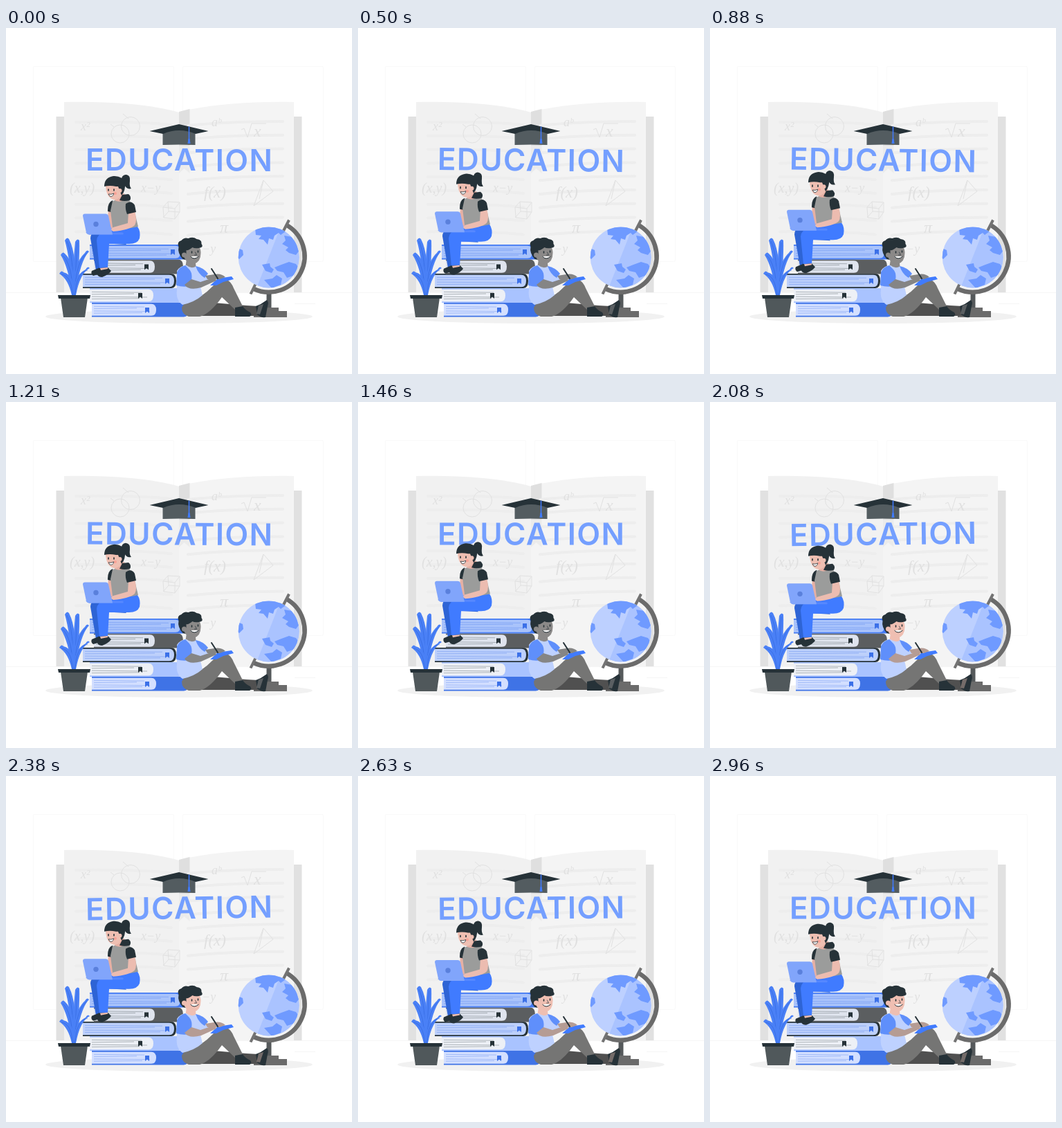
Animation, 500 px wide and 500 px high, one loop 3000 ms. Source, as an HTML page:

```html
<!DOCTYPE html>
<html lang="en">
<head>
<meta charset="utf-8">
<title>Education</title>
<style>
html, body { margin: 0; width: 100%; height: 100%; overflow: hidden; background: #fff; }
svg { display: block; width: 100vw; height: 100vh; }
#title { font: 600 44px Inter, "Open Sans", sans-serif; letter-spacing: 1.4px; fill: #749fff; text-anchor: middle; }
#notes text { font: italic 18px "Liberation Serif", serif; fill: #e0e0e0; }
#notes path, #notes circle { fill: none; stroke: #e1e1e1; }
#lines path { fill: none; stroke: #ededed; stroke-width: 4; stroke-linecap: round; }
#man { --skin: #efbfb2; --arm: #b59c94; }
#man.shade { --skin: #8b8988; --arm: #858585; }
.skin { fill: var(--skin); }
.arm { fill: var(--arm); }
.ink { fill: none; stroke: #263238; stroke-linecap: round; }
</style>
</head>
<body>
<svg viewBox="0 0 500 500">
  <g fill="none" stroke="#f9f9f9">
    <rect x="39.500" y="55.500" width="203" height="282" rx="2"/>
    <rect x="255.500" y="55.500" width="203" height="282" rx="2"/>
    <path d="M0 382.500H500M417 398.500H447" stroke="#f5f5f5"/>
  </g>

  <!-- open book -->
  <path d="M72.500 128H427.500V382H72.500Z" fill="#e1e1e1"/>
  <path d="M84 107C142 106 204 109 250 122V382H84Z" fill="#f1f1f1"/>
  <path d="M416 107C358 106 312 109 264 118L250 122V382H416Z" fill="#f4f4f4"/>
  <path d="M250 121L265.500 117V170H250Z" fill="#dfdfdf"/>
  <path d="M250 170H265.500V210L257.500 203L250 210Z" fill="#ebebeb"/>
  <g id="lines"></g>
  <g id="notes">
    <text x="108" y="148">x²</text>
    <text x="297" y="142">aᵇ</text>
    <text x="92" y="238" style="font-size:20px">(x,y)</text>
    <text x="195" y="237">x−y</text>
    <text x="286" y="245" style="font-size:23px">f(x)</text>
    <text x="309" y="296" style="font-size:24px">π</text>
    <text x="283" y="325">−y</text>
    <text x="358" y="157" style="font-size:24px">x</text>
    <path d="M340 147L344 145L349 158L355 138H376M372 220L386 236L358 257ZM372 220L366 247M227 259L234 251L251 252V266L244 276L228 274ZM227 259L244 261L251 252M244 261V276M227 274L235 265L251 266M235 265L234 251M169 124L177 131M151 139L156 143"/>
    <circle cx="180" cy="142" r="13.500"/>
    <circle cx="165" cy="153" r="13"/>
  </g>

  <ellipse cx="250" cy="417" rx="193" ry="10" fill="#f1f1f1"/>

  <!-- graduation cap -->
  <path d="M226.500 147H273.500V169Q250 168 226.500 169Z" fill="#535c60"/>
  <path d="M207.500 149L250 139L292.500 149L274 153Q250 143 227 153Z" fill="#263238"/>
  <path d="M264.500 142.500V164" fill="none" stroke="#407bff" stroke-width="1.500"/>
  <path d="M263.500 160H265.500L266.500 167H262.500Z" fill="#407bff"/>

  <text id="title" x="250.700" y="206.500">EDUCATION</text>

  <g id="books"></g>

  <!-- plant -->
  <g id="leaves"></g>
  <path d="M79 390H118L114 418H83Z" fill="#50585b"/>
  <path d="M75 386H122L121 391H76Z" fill="#263238"/>

  <!-- globe -->
  <g>
    <path d="M376.500 383H383.500V405H376.500Z" fill="#55595b"/>
    <path d="M366 409Q366 404 372 404H394V409H406V418H358V413Q360 409 366 409Z" fill="#6b6b6b"/>
    <path d="M404 284A51.900 51.900 0 0 1 358 377" fill="none" stroke="#6b6b6b" stroke-width="6.500"/>
    <path d="M409 277.500L400.500 294M362 367L353.500 384.500" stroke="#737373" stroke-width="4"/>
    <clipPath id="ball"><circle cx="379.700" cy="331.400" r="44"/></clipPath>
    <g clip-path="url(#ball)">
      <path d="M335 287H425V376H335Z" fill="#bdd0ff"/>
      <path d="M397 287L362 376H425V287Z" fill="#aac3ff"/>
      <g fill="#6f9aff">
        <path d="M360 290L372 287L399 288L404 294L397 299L394 296L388 300L386 306L380 304L378 313L372 306L365 305L369 300L361 299Z"/>
        <path d="M402 300L414 302L425 320L419 328L409 325L404 321L408 317L399 312L404 307Z"/>
        <path d="M335 318L342 321L343 328L337 334L333 331Z"/>
        <path d="M370 342L381 340L382 345L387 349L384 354L375 351Z"/>
        <path d="M388 346L398 342L409 338L419 341L424 348L415 358L406 361L401 353L392 351Z"/>
        <path d="M373 364L385 362L391 357L399 362L397 371L384 376Z"/>
      </g>
    </g>
  </g>

  <!-- man -->
  <g id="man">
    <path d="M268 416Q278 398 300 397L347 401L365 402V416Z" fill="#505050"/>
    <path d="M361 402L368 399L377 393Q380 396 378 402L375 418Q368 419 363 414Z" fill="#263238"/>
    <path d="M365 401L372 399L367 414L362 413Z" class="arm" opacity=".55"/>
    <path d="M257 399Q281 392 300 372Q310 362 319 364Q325 366 329 376L343 404L331 407L312 389Q295 413 280 417H264Q254 414 254 404Z" fill="#757574"/>
    <path d="M331 404L342 402Q346 408 353 411Q356 415 352 417H331Z" fill="#263238"/>
    <path d="M261 334L274 340L275 349L259 347Z" class="skin"/>
    <path d="M247 351Q252 343 261 343Q268 349 275 344Q284 347 290 358L293 370L281 374L284 386Q273 396 255 400Q245 393 247 378Z" fill="#bed1ff"/>
    <path d="M247 353Q251 345 259 343L265 349Q272 357 265 373Q256 375 246 372Z" fill="#5f8ffb"/>
    <path d="M274 344Q285 346 292 355L287 361Q278 356 274 344Z" fill="#5f8ffb"/>
    <path d="M295 372L306 362L326 359L329 363L314 367L304 372Z" fill="#407bff"/>
    <path d="M258 371Q264 380 282 375L304 365L302 360L281 367L268 363Z" class="arm"/>
    <path d="M288 358L301 356Q311 354 317 360L309 363L291 363Z" class="arm"/>
    <path d="M297 348L306 362" class="ink" stroke-width="2"/>
    <g transform="translate(-.5 -1)">
      <path d="M255 324Q256 312 270 313Q282 314 282 326Q282 339 272 342Q258 341 255 324Z" class="skin"/>
      <path d="M256 335Q248 326 250 317Q247 310 254 308Q258 303 264 305Q271 302 276 306Q284 307 283 313Q287 318 279 319Q273 320 270 318Q264 323 261 322L261 328Q257 325 257 331L260 336Z" fill="#263238"/>
      <circle cx="258" cy="329" r="3.500" class="skin"/>
      <path d="M269 324V326M278 323V325" class="ink" stroke-width="1.600"/>
      <path d="M267 331Q272 337 279 331" fill="#fff" stroke="#263238"/>
      <path d="M274 325L276 329L273 329" class="ink" stroke-width=".7"/>
    </g>
  </g>

  <!-- woman -->
  <g id="woman">
    <path d="M154 289L144 290Q122 292 122 304L130 350H142L138 311L174 313Z" fill="#2e64d5"/>
    <path d="M124 351L136 346L143 350L140 354L126 358Q122 355 124 351Z" fill="#263238"/>
    <path d="M154 288L190 287Q195 294 193 304Q190 312 178 312L149 312L147 347H135L131 307Q132 297 143 295Z" fill="#407bff"/>
    <path d="M135 347L147 346L152 351Q149 356 139 360Q133 360 132 356Z" fill="#263238"/>
    <path d="M136 347L147 346V348L137 350Z" fill="#efbfb2"/>
    <path d="M148 264L154 265L156 288L150 290L146 284Z" fill="#e6b0a4"/>
    <path d="M147 263Q147 252 154 249L157 267L147 265Z" fill="#263238"/>
    <path d="M154 250Q165 246 178 249L184 258L191 287Q173 292 154 288L151 264Z" fill="#9b9c9b"/>
    <path d="M160 242L171 239L173 248Q164 253 157 249Z" fill="#e6b0a4"/>
    <path d="M168 241L177 240Q182 244 179 249Q171 251 164 249Z" fill="#263238"/>
    <path d="M177 266L186 264Q190 279 186 285Q178 292 155 294L150 291L155 288L176 282Z" fill="#ecbcb0"/>
    <path d="M173 254Q181 248 186 256L188 266L175 269Q172 262 173 254Z" fill="#263238"/>
    <g transform="translate(1 1.500)">
      <path d="M114 294H167Q170 295 168 297H119Z" fill="#5688ff"/>
      <path d="M113 267H143Q146 267 147 270L153 297H119Q116 297 115 294L110 270Q110 267 113 267Z" fill="#81a5fb"/>
      <circle cx="129" cy="282" r="3.700" fill="#5a80dc"/>
    </g>
    <path d="M166 222Q167 211 174 212Q180 213 179 221Q178 229 181 232Q174 234 171 226Q169 220 164 226Z" fill="#263238"/>
    <path d="M144 228Q144 216 156 215Q169 215 171 227Q170 235 168 240Q163 249 156 248Q145 246 144 228Z" fill="#efbfb2"/>
    <path d="M142 229Q142 216 155 214Q168 213 172 224Q173 235 167 242L164 234L162 229L159 229Q150 227 142 229Z" fill="#263238"/>
    <circle cx="164.500" cy="235" r="3" fill="#efbfb2"/>
    <path d="M148 233V235M156 233V235" class="ink" stroke-width="1.600"/>
    <path d="M148 240Q152 241 156 239Q154 245 150 243Z" fill="#fff" stroke="#263238" stroke-width=".8"/>
    <circle cx="158" cy="239" r="2" fill="#ff8f83" opacity=".6"/>
  </g>
</svg>
<script>
const $ = id => document.getElementById(id);
const path = (d, fill, extra = '') => `<path d="${d}" fill="${fill}" ${extra}/>`;

// Ruled lines follow the bend of each page.
for (let i = 0; i < 9; i++) {
  const y = 136 + i * 19.8;
  $('lines').innerHTML +=
    path(`M101 ${y}Q190 ${y - 1} 239 ${y + 4}`, 'none') +
    path(`M263 ${y + 5}Q320 ${y - 1} 400 ${y - 1}`, 'none');
}

// A lying book: cover, rounded block of pages, ribbon.
function book(x, end, y, h, cover, pages, pageEnd, ribbon, ribbonX) {
  const block = (l, r, t, b) => `M${l} ${t}H${r - 7}Q${r} ${t} ${r} ${(t + b) / 2}T${r - 7} ${b}H${l}Z`;
  let out = path(block(x, end, y, y + h), cover) +
    path(block(x, pageEnd, y + 1.7, y + h - 1.7), pages);
  for (let i = 1; i < 5; i++) {
    const ly = y + 2 + i * (h - 4) / 5;
    out += path(`M${x + 3} ${ly}L${pageEnd - 6 - i * 11 % 30} ${ly + (i % 2 ? .8 : -.8)}`, 'none',
      `stroke="${ribbon}" stroke-width=".8" opacity=".4"`);
  }
  return out + path(`M${ribbonX} ${y + 7}h6v8l-3-2.500l-3 2.500Z`, ribbon);
}
$('books').innerHTML =
  book(124, 264, 397, 20.5, '#3f73e6', '#d3dfff', 217, '#3b70e8', 201) +
  book(121, 256, 376, 21, '#a9c3ff', '#edf0f6', 213, '#263238', 191) +
  book(111, 246, 355, 21, '#263238', '#bdd0fb', 243, '#3b70e8', 230) +
  book(127, 256, 334.5, 21, '#5b5e60', '#dfe4ee', 215, '#263238', 200) +
  book(121, 262, 313, 21.5, '#4178f2', '#a9c3fb', 252, '#3b70e8', 238);

// Each leaf runs from a base point to a tip through one bend.
const leaves = [
  [96, 386, 98, 330, 88, 304], [98, 386, 101, 340, 103, 306],
  [96, 386, 95, 340, 82, 325], [95, 386, 95, 358, 80, 352],
  [98, 386, 101, 336, 117, 322], [99, 386, 101, 354, 118, 346]
];
$('leaves').innerHTML = leaves.map(([x, y, bx, by, tx, ty]) =>
  path(`M${x} ${y}Q${bx - 5} ${by + 5} ${tx - 3} ${ty + 3}Q${tx} ${ty - 3} ${tx + 3} ${ty + 1}Q${bx + 6} ${by} ${x + 2} ${y}Z`, '#4a80f6') +
  path(`M${x + 1} ${y}Q${bx} ${by} ${tx} ${ty + 4}`, 'none', 'stroke="#2f66dc" stroke-width=".6"')).join('');

// Piecewise linear sway: 0, 1, -1, 0 at quarters 0, 1, 3, 4.
const sway = p => p < .25 ? p * 4 : p < .75 ? 2 - p * 4 : p * 4 - 4;
const start = performance.now();

function draw() {
  const p = (performance.now() - start) % 3000 / 3000;
  $('title').setAttribute('transform', `rotate(${sway(p)} 250 190)`);
  $('woman').setAttribute('transform', `translate(0 ${-10 * (1 - Math.abs(1 - 2 * p))})`);
  $('man').classList.toggle('shade', p < .555);
  requestAnimationFrame(draw);
}
draw();
</script>
</body>
</html>
```
